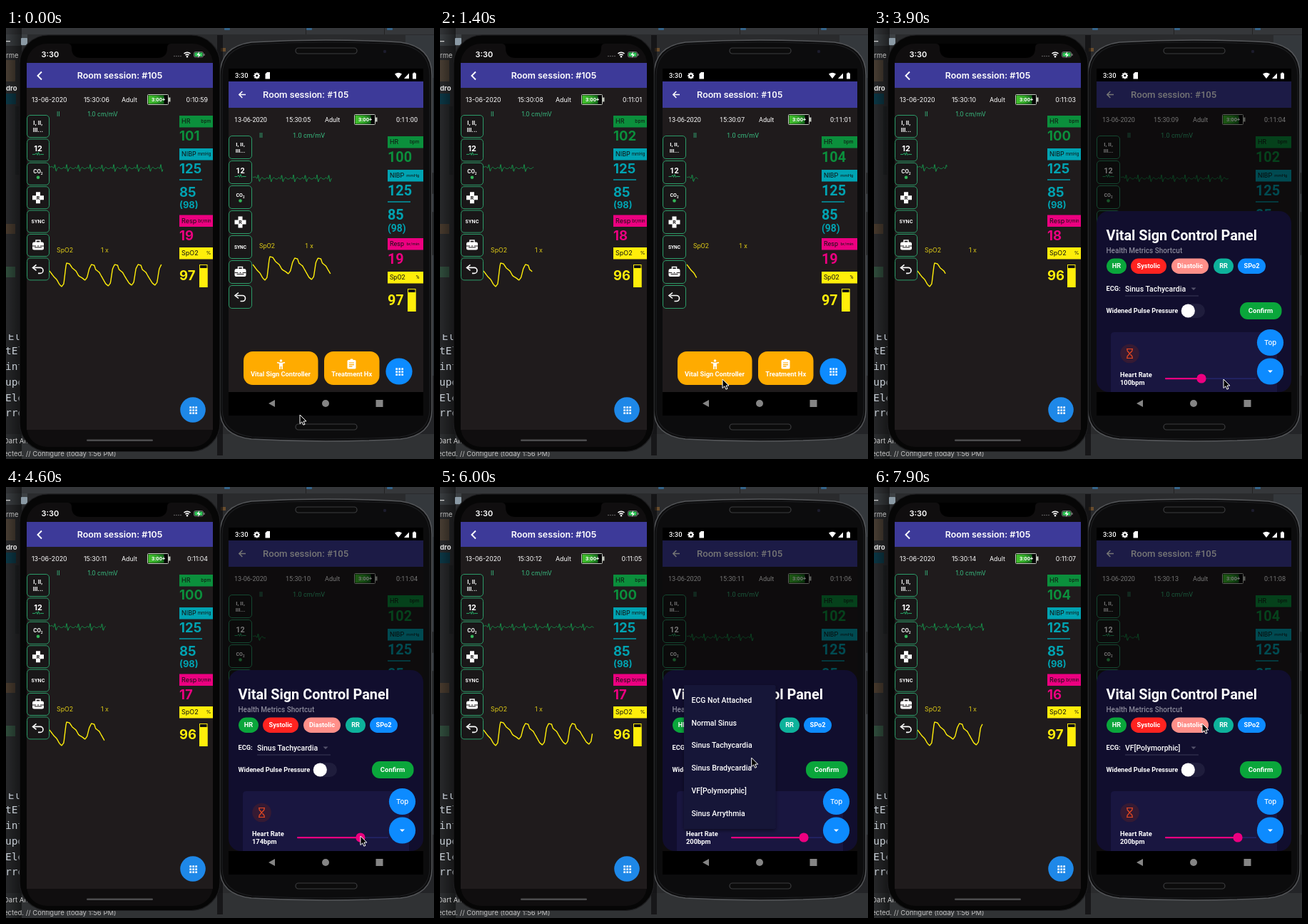
An HTML page that plays this animation: 600 px wide and 605 px high, repeating every 8000 ms.

```html
<!DOCTYPE html>
<html lang="en">
<head>
<meta charset="utf-8">
<title>Patient monitor</title>
<style>
html, body { margin: 0; width: 100%; height: 100%; overflow: hidden; background: #2a2b2d; }
svg { display: block; width: 600px; height: 605px; }
</style>
</head>
<body>
<svg id="stage" viewBox="0 0 600 605" xmlns="http://www.w3.org/2000/svg"></svg>
<script>
const LOOP = 8000;
const INTER = "Inter, sans-serif";
const ROBOTO = "Roboto, sans-serif";
const MONO = "'DejaVu Sans Mono', monospace";
const GREEN = "#0b8f3c", TEAL = "#00a3b2", PINK = "#ec0080", YELLOW = "#ffee0a", BLUE = "#0d8bff";

// ---- markup helpers ----
const rect = (x, y, w, h, fill, r = 0, extra = "") =>
  `<rect x="${x}" y="${y}" width="${w}" height="${h}" rx="${r}" fill="${fill}" ${extra}/>`;
const circle = (x, y, r, fill, extra = "") => `<circle cx="${x}" cy="${y}" r="${r}" fill="${fill}" ${extra}/>`;
const path = (d, fill, stroke = "none", width = 1, extra = "") =>
  `<path d="${d}" fill="${fill}" stroke="${stroke}" stroke-width="${width}" ${extra}/>`;
// Text is placed by the vertical middle of its capitals.
const text = (x, mid, size, str, { fill = "#fff", weight = 400, font = ROBOTO, anchor = "start", id = "" } = {}) =>
  `<text ${id && `id="${id}"`} x="${x}" y="${mid + size * 0.36}" font-size="${size}" fill="${fill}" ` +
  `font-weight="${weight}" font-family="${font}" text-anchor="${anchor}" xml:space="preserve">${str}</text>`;
const group = (id, body, extra = "") => `<g id="${id}" ${extra}>${body}</g>`;
const range = n => [...Array(n).keys()];

function background() {
  const code = ["tEl", "int", "upd", "Ele", "rro"];
  return rect(0, 0, 600, 605, "#2a2b2d") + rect(0, 0, 600, 9, "#35373a") + rect(0, 9, 30, 16, "#3d4144") +
    rect(0, 45, 13, 30, "#4b4035") + rect(0, 92, 14, 15, "#0c3948") + rect(13, 110, 8, 96, "#222426") +
    rect(0, 275, 13, 14, "#4a3c2f") + rect(0, 335, 13, 15, "#32503f") + rect(0, 430, 20, 140, "#28292b") +
    rect(0, 570, 600, 35, "#303234") +
    [310, 425, 538].map(x => rect(x - 4, 0, 8, 3, "#35648a", 1)).join("") +
    rect(420, 0, 1, 9, "#222") + rect(530, 0, 1, 9, "#222") + rect(301, 28, 7, 5, "#694d2d") +
    rect(560, 10, 40, 60, "#34383c") + rect(585, 70, 15, 420, "#2c3035") + rect(575, 488, 25, 82, "#232427") +
    rect(0, 0, 22, 605, "url(#edgeShade)") + rect(296, 10, 8, 590, "#0a0a0b", 0, 'opacity=".65"') +
    rect(0, 18, 6, 1.3, "#ccc") + rect(21, 14, 9, 10, "#8b9aa5", 1) +
    text(0, 39, 9.5, "rme", { fill: "#bbb", font: INTER }) + text(0, 85, 9.5, "dro", { fill: "#ddd", weight: 700, font: INTER }) +
    `<g clip-path="url(#codeClip)">${text(-6, 433, 14.5, ",Ele", { fill: "#b9c0c8", font: MONO })}</g>` +
    code.map((s, i) => text(-1, 453 + i * 21.8, 14.5, s, { fill: "#c3cad1", font: MONO })).join("") +
    text(-3, 580, 9.5, "Dart An", { fill: "#ccc", font: INTER }) +
    text(-3, 598, 9.5, "ected. // Configure (today 1:56 PM)", { fill: "#c4c4c4", font: INTER });
}

function battery(x, y) {
  return rect(x, y, 29, 14, "#050505", 1, 'stroke="#c4c9c0" stroke-width="1"') + rect(x + 29.5, y + 4, 2.5, 6, "#c4c9c0") +
    rect(x + 1, y + 1, 22, 12, "url(#charge)") + text(x + 15, y + 7, 7.5, "3:00+", { weight: 700, anchor: "middle" });
}

const dots = (x, y) => range(9).map(i => rect(x - 5 + (i % 3) * 4, y - 5 + Math.floor(i / 3) * 4, 2.7, 2.7, "#fff")).join("");

function toolButtons(x, y, size, pitch, font) {
  const c = x + size / 2, label = (mid, s, str) => text(c, mid, s, str, { weight: 700, font, anchor: "middle" });
  const icons = [
    m => label(m - 4.5, 7.8, "I, II,") + label(m + 4.8, 7.8, "III..."),
    m => label(m - 2, 10.8, "12") + path(`M${c - 8} ${m + 6}h4l1.5-2 1.5 3 1.5-4 1.5 4 1-1h5`, "none", "#25a865", 1),
    m => label(m - 3, 7, 'CO<tspan font-size="4.5" dy="1.5">2</tspan>') + circle(c, m + 5, 2.3, "#35b65a"),
    m => path(`M${c - 3} ${m - 8}h6v5h5v6h-5v5h-6v-5h-5v-6h5z`, "#fff") + text(c, m, 7, "R", { fill: "#1c191a", weight: 700, anchor: "middle" }),
    m => label(m, 6.6, "SYNC"),
    m => path(`M${c - 3} ${m - 4}v-3h6v3`, "none", "#fff", 1.5) + rect(c - 8, m - 4.5, 16, 11, "#fff", 2.5) +
      path(`M${c - 8} ${m + 1}h5m2 0h2m2 0h5`, "none", "#1c191a", 1.2) + rect(c - 5, m + 2.5, 10, 1, "#1c191a"),
    m => path(`M${c - 6} ${m - 2}H${c + 3}a4 4 0 0 1 0 8h-3`, "none", "#fff", 1.6) + path(`M${c - 2.5} ${m - 6}l-5 4 5 4`, "none", "#fff", 1.6)
  ];
  return icons.map((icon, i) => rect(x, y + i * pitch, size, size, "#191718", 4.5, 'stroke="#2c9b68" stroke-width="1"') +
    icon(y + i * pitch + size / 2)).join("");
}

function vitals(id, x, width, ys, font, size) {
  const [hr, hrNum, nibp, sys, bar, dia, mean, resp, respNum, spo, spoNum] = ys;
  const tag = (y, name, unit, fill) => rect(x, y - 8, width, 16.5, fill) +
    text(x + 3, y, 9, name, { fill: "#111", font }) +
    text(x + 44.5, y, unit.length > 3 ? 6 : 6.8, unit, { fill: "#111", font, anchor: "end" });
  const num = (y, str, fill, key, s = size) => text(x, y, s, str, { fill, weight: 700, font, id: key && id + key });
  return tag(hr, "HR", "bpm", GREEN) + num(hrNum, "", GREEN, "Hr") + tag(nibp, "NIBP", "mmHg", TEAL) +
    num(sys, "125", TEAL) + rect(x, bar - 0.7, 32, 1.4, TEAL) + num(dia, "85", TEAL) + num(mean, "(98)", TEAL, "", size * 0.7) +
    tag(resp, "Resp", "br/min", PINK) + num(respNum, "", PINK, "Resp") +
    tag(spo, "SpO2", "%", YELLOW) + num(spoNum, "", YELLOW, "Spo") +
    rect(x + 28.5, spoNum - 15, 10.5, 31, "#111", 0, `stroke="${YELLOW}"`) + rect(x + 28, spoNum - 10.5, 11.5, 27, YELLOW);
}

function traces(id) {
  return `<path id="${id}Ecg" fill="none" stroke="#16934b" stroke-width="1" stroke-linejoin="round"/>` +
    `<path id="${id}Pulse" fill="none" stroke="${YELLOW}" stroke-width="1.4" stroke-linejoin="round"/>`;
}

function leftPhone() {
  const o = { font: INTER }, g = { font: INTER, fill: "#38bd80" }, y = { font: INTER, fill: "#dfcb16" };
  return rect(19, 10, 281, 584.5, "#060606", 40, 'stroke="#1d1d1f" stroke-width="1.2"') + rect(29, 22, 261, 566, "#100e0f", 28) +
    rect(29, 84, 261, 480, "#1f1b1c") + path("M87 22q5 0 5 6q0 14 14 14H212q14 0 14-14q0-6 5-6z", "#000") +
    text(62, 37, 11, "3:30", { weight: 600, font: INTER, anchor: "middle" }) +
    range(4).map(i => circle(236 + i * 3, 39.5, 0.8, "#777")).join("") +
    path("M249.5 36a6.5 6.5 0 0 1 9 0M251.5 38.3a3.6 3.6 0 0 1 5 0", "none", "#fff", 1.5) + circle(254, 40.3, 1.2, "#fff") +
    rect(263.5, 33.5, 13, 7.5, "#111", 2, 'stroke="#888" stroke-width=".8"') + rect(264.5, 34.5, 11, 5.5, "#32c759", 1) +
    path("M271 33l-3.5 5h2.5l-.8 4 3.6-5h-2.5z", "#fff") + rect(277.3, 36, 1.2, 3, "#888") +
    rect(29, 49, 261, 35, "#3d3a99") + path("M50 61.5l-5.5 5.5 5.5 5.5", "none", "#fff", 1.9) +
    text(159.5, 67, 12.4, "Room session: #105", { weight: 600, font: INTER, anchor: "middle" }) +
    text(36, 100.4, 8.8, "13-06-2020", o) + text(109, 100.4, 8.8, "", { ...o, id: "lClock" }) + text(162, 100.4, 8.8, "Adult", o) +
    battery(198.5, 93.5) + text(283, 100.4, 8.8, "", { ...o, id: "lElapsed", anchor: "end" }) +
    text(71, 121, 8.7, "II", g) + text(114.5, 121, 8.6, "1.0 cm/mV", g) +
    text(71, 312, 8.8, "SpO2", y) + text(133, 312, 8.8, "1 x", y) + traces("l") +
    toolButtons(29.5, 122.5, 31, 33.4, INTER) +
    vitals("l", 243, 47, [131, 151, 177, 197, 213, 230.5, 248, 270.5, 291, 316, 347.5], INTER, 18.5) +
    circle(262, 536, 17.8, "#1e88e8") + dots(262.3, 536.3) + rect(113, 577.5, 93, 2.6, "#4c4c4e", 1.3);
}

function sheet() {
  const bold = { weight: 700 }, mid = { weight: 700, anchor: "middle" };
  const chips = [[326, 28, "#0aa63b", "HR"], [360, 50, "#ff2320", "Systolic"], [417, 52, "#ff8f89", "Diastolic"],
    [476, 28, "#0eb29b", "RR"], [510, 39, BLUE, "SPo2"]];
  return rect(312, 257, 273, 254, "#110e2e", 17) +
    text(325.5, 291.3, 19.85, "Vital Sign Control Panel", bold) +
    text(325.5, 312, 10, "Health Metrics Shortcut", { fill: "#8a899a", weight: 500 }) +
    chips.map(([x, w, fill, s]) => rect(x, 323.5, w, 21.5, fill, 10.7) + text(x + w / 2, 334, 9.2, s, mid)).join("") +
    text(325.5, 366, 9.2, "ECG:", bold) + text(352, 366, 10.5, "", { weight: 500, id: "rhythm" }) +
    path("M444.500 364.500h7l-3.500 3.500z", "#55536c") + rect(352, 375.5, 103, 1, "#3b3957") +
    text(325.5, 397, 9.2, "Widened Pulse Pressure", bold) + rect(432, 387, 32, 20, "#1f1d3c", 10) + circle(440.3, 397, 9.6, "#fff") +
    rect(513, 385, 58.5, 24, "#0aa63b", 11) + text(542, 397, 9.5, "Confirm", mid) +
    path("M332 511V432q0-5 5-5H560q5 0 5 5V511z", "#191640") +
    circle(358.5, 457, 13.3, "#351a33") + path("M354 450.500h9m-9 13h9m-8-13v2.500l7 8v2.500m0-13v2.500l-7 8v2.500", "none", "#ea4a20", 1.2) +
    text(345, 487, 9.3, "Heart Rate", bold) + text(345, 498, 9.3, "", { weight: 700, id: "bpm" }) +
    rect(408, 491.2, 128, 1.8, "#222464") + rect(408, 491, 50, 2.2, PINK, 1, 'id="sliderFill"') + circle(459, 492, 6.6, PINK, 'id="thumb"') +
    circle(555.5, 441.5, 18.6, BLUE) + text(555.5, 441.5, 9.6, "Top", { weight: 500, anchor: "middle", font: INTER }) +
    circle(555.5, 482, 18.6, BLUE) + path("M552 480.500h7l-3.500 3.500z", "#fff");
}

function menu() {
  const items = ["ECG Not Attached", "Normal Sinus", "Sinus Tachycardia", "Sinus Bradycardia", "VF[Polymorphic]", "Sinus Arrythmia"];
  return rect(342, 278, 128.5, 202, "#171538", 2, 'filter="url(#soft)"') +
    items.map((s, i) => text(352.5, 299 + i * 31.8, 10.5, s, { weight: 500 })).join("");
}

function rightPhone() {
  const g = { fill: "#38bd80" }, y = { fill: "#dfcb16" }, mid = { weight: 700, anchor: "middle" };
  const slot = yy => rect(406, yy - 4, 86, 8, "#0c0c0c", 4, 'stroke="#3b3c3e" stroke-width="1.2"');
  const gear = range(8).map(i => rect(350.8, 62.7, 1.8, 8.6, "#fff", 0, `transform="rotate(${i * 45} 351.7 67)"`)).join("");
  const screen = rect(312, 57, 273, 487, "#000") + rect(312, 112, 273, 399, "#1f1b1c") + rect(312, 75, 273, 37, "#3d3a99") +
    path("M336 93.500h-9m4.300-4.500l-4.500 4.500 4.500 4.500", "none", "#fff", 1.5) +
    text(360, 93.5, 13.1, "Room session: #105", { weight: 500 }) +
    text(320, 128.4, 9.1, "13-06-2020") + text(392, 128.4, 9.1, "", { id: "rClock" }) + text(447, 128.4, 9.1, "Adult") +
    battery(488.5, 121.5) + text(577, 128.4, 9.1, "", { id: "rElapsed", anchor: "end" }) +
    text(355, 150.4, 9.1, "II", g) + text(402, 150.4, 9.1, "1.0 cm/mV", g) +
    text(355, 306, 9.1, "SpO2", y) + text(419, 306, 9.1, "1 x", y) + traces("r") +
    toolButtons(312.5, 151.5, 32, 35, ROBOTO) +
    vitals("r", 535, 50, [160, 181, 207, 227.5, 244, 261.5, 281, 303, 323.5, 350, 381.5], ROBOTO, 19.8) +
    rect(333, 454, 104.5, 47, "#ffab00", 13) + text(385, 486, 9.3, "Vital Sign Controller", mid) +
    circle(385.5, 467, 1.8, "#fff") + path("M380 469.500q5.500 2 11 0M384 471v8m3-8v8", "none", "#fff", 1.7) + rect(383.3, 470, 4.400, 5, "#fff") +
    rect(446, 454, 77.5, 47, "#ffab00", 13) + text(484.7, 486, 9.3, "Treatment Hx", mid) +
    rect(478.5, 466, 12, 12.5, "#fff", 1.5) + rect(482.5, 464.5, 4, 3, "#fff", 1) +
    path("M481 470h7m-7 2.600h7m-7 2.600h4.500", "none", "#ffab00", 1.2) +
    circle(551, 482, 18.6, BLUE) + dots(551.3, 482.3) +
    rect(312, 75, 273, 436, "#000", 0, 'id="scrim"') +
    `<g clip-path="url(#appClip)">${group("sheet", sheet())}</g>` + group("menu", menu()) +
    rect(312, 511, 273, 33, "#000") + path("M377 522v10l-9-5z", "#858585") + circle(448, 527, 5, "#858585") + rect(518.5, 522, 10, 10, "#858585") +
    text(321, 67, 9.4, "3:30", { weight: 500 }) + gear + circle(351.7, 67, 3.2, "#fff") + circle(351.7, 67, 1.4, "#000") +
    path("M363.500 71.500v-7l2.500-2.500h4v9.500z", "#fff") + path("M545 64.500q5-3.500 10 0l-5 6.500z", "#fff") +
    path("M558 71l7-7.500v7.500z", "#fff") + rect(570, 63.5, 5, 8, "#fff", 0.6) + rect(571.5, 62.5, 2, 1.5, "#fff");
  return rect(595, 203, 4, 30, "#111", 1) + rect(595, 258, 4, 61, "#111", 1) +
    path("M300 66Q300 26 344 20Q448 14 553 20Q597 26 597 66V536Q597 572 553 577Q448 583 344 577Q300 572 300 536z", "#0c0c0d", "#55575a", 1.4) +
    path("M303 67Q303 29 345 23Q448 17 552 23Q594 29 594 67V535Q594 569 552 574Q448 580 345 574Q303 569 303 535z", "none", "#1d1e20", 1.2) +
    slot(32) + slot(560) + circle(531, 33, 2.2, "#1c1c2c") + screen;
}

document.getElementById("stage").innerHTML = `<defs>
  <linearGradient id="charge"><stop offset="0" stop-color="#43c32d"/><stop offset=".55" stop-color="#2fa527"/><stop offset="1" stop-color="#12651b"/></linearGradient>
  <linearGradient id="edgeShade"><stop offset="0" stop-color="#000" stop-opacity=".05"/><stop offset="1" stop-color="#000" stop-opacity=".5"/></linearGradient>
  <filter id="soft" x="-10%" y="-10%" width="120%" height="120%"><feDropShadow dx="0" dy="2" stdDeviation="2.500" flood-opacity=".5"/></filter>
  <clipPath id="appClip"><rect x="312" y="75" width="273" height="436"/></clipPath>
  <clipPath id="codeClip"><rect x="0" y="430" width="20" height="14"/></clipPath>
  </defs>` + background() + rightPhone() + leftPhone() +
  group("cursor", path("M0 0V12.500L2.900 9.800 4.900 14.200 7 13.300 5 9H9z", "#000", "#fff", 1));

// ---- motion ----
const $ = id => document.getElementById(id);
const write = (id, str) => { if ($(id).textContent !== String(str)) $(id).textContent = str; };
const clamp = v => Math.min(1, Math.max(0, v));
const easeOut = p => 1 - (1 - p) ** 3;
const smooth = p => p * p * (3 - 2 * p);
const step = (keys, t) => keys.filter(k => k[0] <= t).pop()[1];
const pad = n => String(n).padStart(2, "0");

function along(keys, t) {
  const i = Math.max(1, keys.findIndex(k => k[0] > t));
  const [a, b] = t >= keys.at(-1)[0] ? keys.slice(-2) : [keys[i - 1], keys[i]];
  const p = smooth(clamp((t - a[0]) / (b[0] - a[0])));
  return a.slice(1).map((v, k) => v + (b[k + 1] - v) * p);
}

function ecgAt(d) {
  const phase = (d + 0.5) % 16.5;
  const bump = (at, width, height) => height * Math.exp(-(((phase - at) / width) ** 2));
  return -3 * Math.exp(-d / 4) - bump(4, 1.4, 2) - bump(8, 0.8, 6) + bump(9.8, 0.9, 4) - bump(13.5, 1.6, 2);
}

// A first fall, then pulses that rise steeply and sink slowly to the next trough.
const troughs = [18, 9, 17, 16, 16, 16];
const pulsePoints = [[0, -4], [6, 4], [10, 8], [14, 15]];
troughs.slice(0, -1).forEach((trough, k) => {
  const lag = k ? 2 : 0;
  for (const [dx, y] of [[0, trough], [3, trough - 4], [6, -11 + 2 * lag], [7 + lag, -15 + lag], [11 + lag, -14 + lag],
    [15, -8 + lag], [20, -4 + lag], [24, 3 + lag], [29, troughs[k + 1] - 3]])
    pulsePoints.push([17 + k * 32.7 + dx, y]);
});

function pulseAt(d) {
  const i = Math.max(1, pulsePoints.findIndex(p => p[0] > d));
  const [[x0, y0], [x1, y1]] = [pulsePoints[i - 1], pulsePoints[i]];
  return y0 + (y1 - y0) * (d - x0) / (x1 - x0);
}

function plot(x, y, length, fn) {
  const n = Math.ceil(length / 0.6);
  return "M" + range(n + 1).map(i => Math.min(length, i * 0.6))
    .map(d => `${(x + d).toFixed(1)} ${(y + fn(d)).toFixed(1)}`).join("L");
}

function drawTraces(id, t, x, ecgY, pulseY, start, period) {
  const swept = (((t - start) % period) + period) % period * 0.054;
  $(id + "Ecg").setAttribute("d", plot(x, ecgY, swept, ecgAt));
  $(id + "Pulse").setAttribute("d", plot(x, pulseY, Math.max(0, swept - 2), pulseAt));
}

const seconds = (t, lead) => Math.floor((t + lead) / 1000);
const elapsed = s => `0:${Math.floor(s / 60)}:${pad(s % 60)}`;

const HR_LEFT = [[0, 101], [350, 102], [2000, 104], [3350, 100], [6300, 104]];
const HR_RIGHT = [[0, 100], [1150, 104], [2150, 101], [3150, 102], [7150, 104]];
const RESP_LEFT = [[0, 19], [350, 18], [4350, 17], [7350, 16]];
const SPO_LEFT = [[0, 97], [350, 96], [7350, 97]];
const POINTER = [[0, 412, 543], [900, 398, 496], [1400, 396, 493], [1700, 396, 493], [2400, 452, 359], [2900, 452, 362],
  [3900, 490, 493], [4150, 459, 490], [4300, 459, 490], [4750, 510, 490], [4850, 510, 490], [5300, 444, 372],
  [5650, 444, 368], [6900, 406, 431], [7250, 406, 428], [7800, 460, 332]];

function draw(t) {
  drawTraces("l", t, 61, 197.5, 345, 100, 3040);
  drawTraces("r", t, 346, 212, 336, 1110, 3160);
  write("lClock", "15:30:" + pad(6 + seconds(t, 650)));
  write("rClock", "15:30:" + pad(5 + seconds(t, 850)));
  write("lElapsed", elapsed(659 + seconds(t, 850)));
  write("rElapsed", elapsed(660 + seconds(t, 350)));
  write("lHr", step(HR_LEFT, t));
  write("rHr", step(HR_RIGHT, t));
  write("lResp", step(RESP_LEFT, t));
  write("rResp", 19);
  write("lSpo", step(SPO_LEFT, t));
  write("rSpo", 97);

  const open = easeOut(clamp((t - 1650) / 300));
  $("scrim").setAttribute("opacity", 0.54 * open);
  $("sheet").setAttribute("transform", `translate(0 ${(1 - open) * 258})`);

  const thumb = along([[0, 459], [4300, 459], [4750, 510]], t)[0];
  $("thumb").setAttribute("cx", thumb);
  $("sliderFill").setAttribute("width", thumb - 408);
  write("bpm", Math.round((thumb - 408) / 51 * 100) + "bpm");

  const shown = clamp((t - 5600) / 250) * (1 - clamp((t - 7250) / 150));
  $("menu").setAttribute("opacity", shown);
  write("rhythm", t < 7250 ? "Sinus Tachycardia" : "VF[Polymorphic]");

  $("cursor").setAttribute("transform", `translate(${along(POINTER, t).join(" ")})`);
}

const begin = performance.now();
function tick() {
  draw((performance.now() - begin) % LOOP);
  requestAnimationFrame(tick);
}
tick();
</script>
</body>
</html>
```
